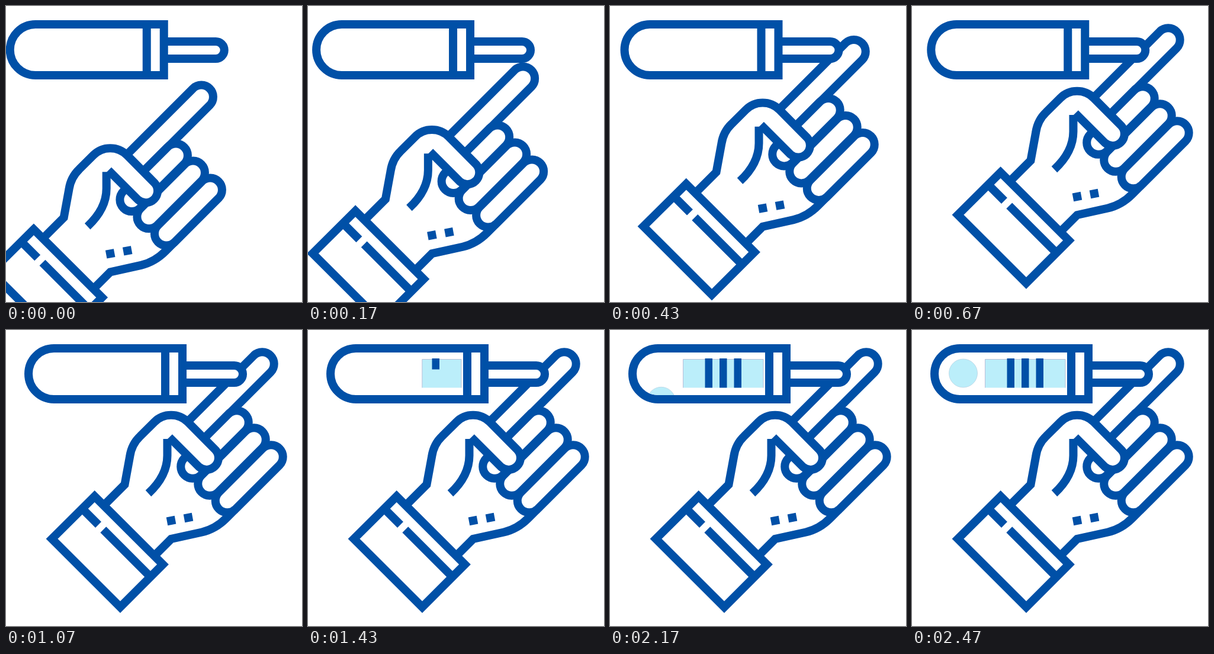
Animation of 500x500 px, one loop 3 s. Source, as an HTML page:

```html
<!DOCTYPE html>
<html lang="en">
<head>
<meta charset="utf-8">
<title>Finger prick test</title>
<style>
  html, body { margin: 0; width: 100%; height: 100%; overflow: hidden; background: #fff; }
  svg { display: block; width: 100vw; height: 100vh; }
  .line { fill: #fff; stroke: #0050a7; stroke-width: 14; }
  .open { fill: none; }
  .bar { fill: #0050a7; }
  .cyan { fill: #bbeefa; }
  .edge { fill: none; stroke: #b9bfd8; }
</style>
</head>
<body>
<svg viewBox="0 0 500 500">
  <defs>
    <clipPath id="inside"><path d="M262 38H81a36 36 0 0 0 0 72H262z"/></clipPath>
  </defs>

  <g id="hand" class="line">
    <g id="fingers"></g>
    <path d="M165 296.5L200.5 261L209.3 213Q212.3 193 226.5 179.5L250.4 155.7A40 40 0 0 1 307.3 155.7
             L354.1 202.9A20 20 0 0 1 325.9 231.1L275.9 181.1"/>
    <path class="open" d="M272.5 184V212C272.5 237 261 257 240.5 276"/>
    <path class="open" d="M387 303L372 318Q354 336 331 341.5L279 353L250.5 381.5"/>
    <path d="M149.7 281L77.5 352.7L193 468L265 396Z"/>
    <path class="open" d="M129 302l27 27M164.3 337.3l79.7 79.7M272 323.3l14 -2.6M301 318.3l14 -2.6"/>
  </g>

  <g id="tube" class="line">
    <path d="M298 60H385.5a14.5 14.5 0 0 1 0 29H298"/>
    <path d="M298 31H81a43 43 0 0 0 0 86H298z"/>
    <path d="M269 31V117"/>
  </g>

  <g clip-path="url(#inside)">
    <rect id="strip" class="cyan" y="49.5" height="48"/>
    <path id="stripEdge" class="edge"/>
    <g id="bars" class="bar"></g>
    <circle id="drop" class="cyan" cx="86.5" r="24" stroke="#b9d3e4" stroke-width=".8"/>
  </g>
</svg>
<script>
const LOOP = 3000;
const $ = id => document.getElementById(id);

function add(parent, tag, attrs) {
  const node = document.createElementNS('http://www.w3.org/2000/svg', tag);
  for (const key in attrs) node.setAttribute(key, attrs[key]);
  return parent.appendChild(node);
}

// Diagonal capsule between two tip centres.
function finger(x1, y1, x2, y2) {
  const k = 14.14;
  add($('fingers'), 'path', {
    d: `M${x1 - k} ${y1 - k}A20 20 0 0 1 ${x1 + k} ${y1 + k}` +
       `L${x2 + k} ${y2 + k}A20 20 0 0 1 ${x2 - k} ${y2 - k}Z`
  });
}
finger(433, 57, 310, 180);
finger(390, 156, 315, 231);
finger(419, 185, 344, 260);
finger(448, 214, 373.5, 288.5);

const bars = [209.5, 185, 160.5].map(x =>
  add($('bars'), 'rect', { x, y: 48, width: 12.5, height: 0 }));

const clamp = u => Math.min(1, Math.max(0, u));

// Cubic that leaves with the given slope and settles smoothly.
function settle(t, start, duration, slope) {
  const u = clamp((t - start) / duration);
  return slope * u * (1 - u) ** 2 + u * u * (3 - 2 * u);
}

function draw(t) {
  const away = 1 - settle(t, 0, 680, 1.18);
  $('hand').setAttribute('transform', `translate(${-103 * away} ${96.5 * away})`);

  const back = 1 - settle(t, 0, 1067, 1.47);
  $('tube').setAttribute('transform', `translate(${-31.3 * back} 0)`);

  const width = 135.5 * settle(t, 1080, 1090, 1.65);
  const left = 259 - width;
  $('strip').setAttribute('x', left);
  $('strip').setAttribute('width', width);
  $('stripEdge').setAttribute('d', width ? `M${left} 97.5V49.5H259V97.5` : '');

  bars.forEach((bar, i) =>
    bar.setAttribute('height', 49.5 * clamp((t - 1330 - 185 * i) / 270)));

  $('drop').setAttribute('cy', 73 + 62 * (1 - settle(t, 2100, 367, 1.1)));
}

function tick() {
  draw(performance.now() % LOOP);
  requestAnimationFrame(tick);
}
tick();
</script>
</body>
</html>
```
